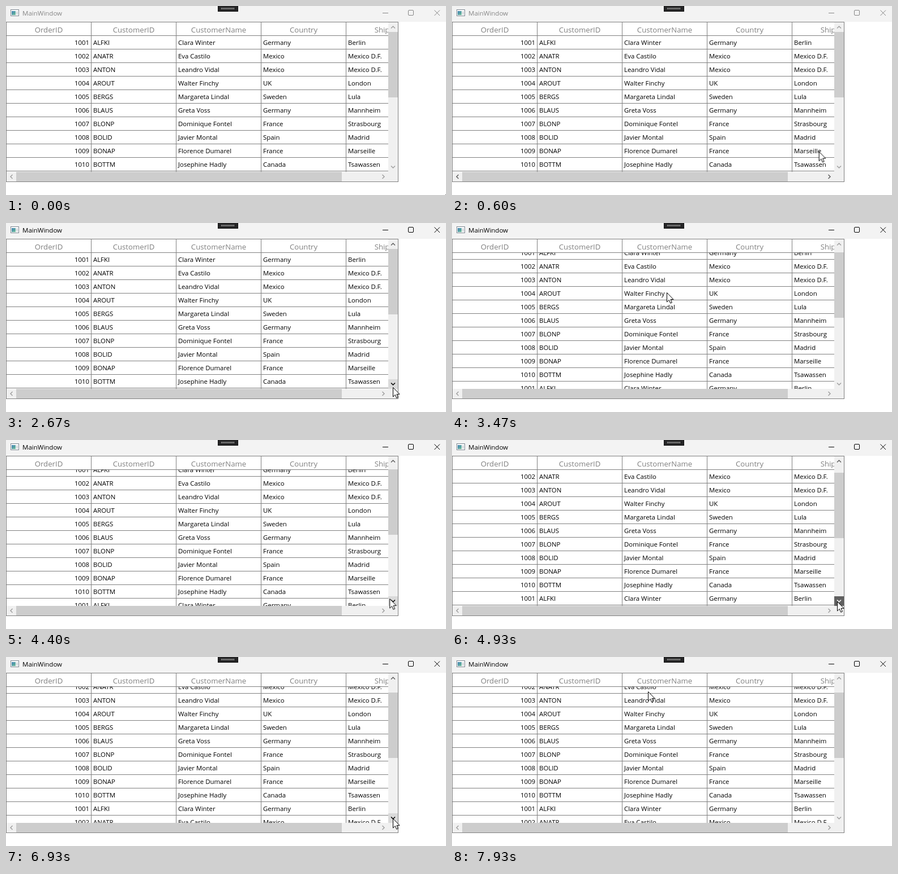
Animation of 777x335 px, one loop 8 s. Source, as an HTML page:

```html
<!DOCTYPE html>
<html lang="en">
<head>
<meta charset="utf-8">
<title>MainWindow</title>
<style>
  html, body { margin: 0; width: 100%; height: 100%; overflow: hidden; background: #fff; }
  body { position: relative; font: 11.4px "Open Sans", "Noto Sans", sans-serif; color: #000; cursor: default; }
  div, svg { position: absolute; box-sizing: border-box; }
  svg { fill: none; overflow: visible; }

  /* one 120-step clock shared by every part */
  .anim { animation: 8s step-end -4ms infinite; }

  #bar { left: 0; top: 0; width: 777px; height: 28px; background: #f3f3f3; animation-name: activate; }
  #bar span { position: absolute; left: 29px; top: 0; font-size: 11.5px; line-height: 26px; }
  #bar svg { left: 0; top: 0; }
  #tool { left: 374px; top: 0; width: 36px; height: 10px; background: #252526; border: 1px solid #111; border-top: 0; }
  #tool div { left: 5px; top: 3px; width: 24px; height: 3px;
    background: repeating-linear-gradient(90deg, #aaa 0 1px, transparent 1px 2px); }

  #grid { left: 0; top: 28px; width: 693px; height: 284px; border: 1px solid #808080; background: #fff; overflow: hidden; }
  #head { left: 0; top: 0; width: 674px; height: 24px; overflow: hidden; }
  #view { left: 0; top: 24px; width: 674px; height: 241px; overflow: hidden; }
  #rows { left: 0; top: 0; width: 750px; animation-name: scroll; }
  .line { width: 750px; height: 24px; }
  .cell { top: 0; width: 150px; height: 24px; padding: 0 3px; line-height: 23px; white-space: nowrap;
    border: solid #808080; border-width: 0 1px 1px 0; }
  .cell:first-child { text-align: right; }
  #head .cell { padding-top: 3px; line-height: 20px; font-size: 13.2px; text-align: center; color: #808080; }

  #vbar { left: 674px; top: 0; width: 17px; height: 282px; background: #f0f0f0; }
  #hbar { left: 0; top: 265px; width: 674px; height: 17px; background: #f0f0f0; }
  .thumb { background: #cdcdcd; }
  #vthumb { left: 0; top: 17px; width: 17px; height: 116px; animation-name: thumb; }
  #hthumb { left: 17px; top: 0; width: 575px; height: 17px; }
  .btn { width: 17px; height: 17px; color: #a0a0a0; }
  .btn svg { left: 0; top: 0; stroke: currentColor; stroke-width: 1.5; }
  #up { left: 0; top: 0; animation-name: up; }
  #down { left: 0; top: 248px; animation-name: down; }
  #down svg { transform: rotate(180deg); }
  #left { left: 0; top: 0; animation-name: side; }
  #left svg { transform: rotate(-90deg); }
  #right { left: 657px; top: 0; animation-name: side; }
  #right svg { transform: rotate(90deg); }
  #mouse { left: 0; top: 0; animation-name: mouse; }

  @keyframes activate {
    0% { color: #868686; }
    33.333%, 100% { color: #000; }
  }
  @keyframes scroll {
    0% { transform: none; }
    34.167% { transform: translateY(-12px); }
    60.833% { transform: translateY(-24px); }
    85%, 100% { transform: translateY(-36px); }
  }
  @keyframes thumb {
    0% { transform: none; background: #cdcdcd; }
    19.167% { background: #a6a6a6; }
    20.833% { background: #cdcdcd; }
    34.167% { transform: translateY(6px); }
    60.833% { transform: translateY(12px); }
    85%, 100% { transform: translateY(17px); background: #cdcdcd; }
  }
  @keyframes up {
    0%, 24.167%, 39.167%, 65.833%, 87.5%, 100% { color: #a0a0a0; background: #f0f0f0; }
    13.333%, 19.167%, 27.5%, 51.667%, 80.833% { color: #606060; background: #f0f0f0; }
    15% { color: #000; background: #dadada; }
  }
  @keyframes down {
    0%, 24.167%, 39.167%, 65.833%, 87.5%, 100% { color: #a0a0a0; background: #f0f0f0; }
    13.333%, 51.667% { color: #606060; background: #f0f0f0; }
    23.333%, 27.5%, 35%, 52.5%, 62.5%, 80.833%, 86.667% { color: #000; background: #dadada; }
    34.167%, 60.833%, 85% { color: #fff; background: #606060; }
  }
  @keyframes side {
    0%, 9.167%, 27.5%, 100% { color: #a0a0a0; }
    6.667%, 25% { color: #606060; }
  }
  @keyframes mouse {
    0% { transform: translate(776px, 334px); }
    3.333% { transform: translate(723px, 334px); }
    4.167% { transform: translate(700px, 345px); }
    6.667% { transform: translate(655px, 291px); animation-timing-function: steps(3); }
    9.167% { transform: translate(633px, 191px); }
    10% { transform: translate(633px, 191px); animation-timing-function: steps(6); }
    15% { transform: translate(678px, 48px); animation-timing-function: steps(2); }
    16.667% { transform: translate(680px, 36px); }
    17.5% { transform: translate(680px, 36px); animation-timing-function: steps(7); }
    23.333% { transform: translate(677px, 265px); animation-timing-function: steps(2); }
    25% { transform: translate(662px, 302px); animation-timing-function: steps(2); }
    26.667% { transform: translate(668px, 313px); animation-timing-function: steps(2); }
    28.333% { transform: translate(683px, 291px); }
    37.5% { transform: translate(683px, 291px); animation-timing-function: steps(7); }
    43.333% { transform: translate(379px, 123px); }
    45% { transform: translate(379px, 123px); animation-timing-function: steps(4); }
    48.333% { transform: translate(591px, 245px); animation-timing-function: steps(4); }
    51.667% { transform: translate(675px, 278px); animation-timing-function: steps(9); }
    59.167% { transform: translate(680px, 285px); }
    60.833% { transform: translate(680px, 286px); }
    65% { transform: translate(680px, 286px); animation-timing-function: steps(6); }
    70% { transform: translate(400px, 120px); animation-timing-function: steps(2); }
    71.667% { transform: translate(282px, 62px); animation-timing-function: steps(6); }
    76.667% { transform: translate(639px, 283px); animation-timing-function: steps(3); }
    79.167% { transform: translate(670px, 286px); }
    80% { transform: translate(670px, 286px); animation-timing-function: steps(3); }
    82.5% { transform: translate(683px, 286px); }
    86.667% { transform: translate(683px, 286px); animation-timing-function: steps(10); }
    95% { transform: translate(322px, 61px); animation-timing-function: steps(5); }
    99.167%, 100% { transform: translate(346px, 61px); }
  }
</style>
</head>
<body>
<div id="bar" class="anim">
  <svg width="777" height="28" stroke="currentColor">
    <defs><linearGradient id="pane" x2="1" y2="1">
      <stop stop-color="#3f7fb5"/><stop offset="1" stop-color="#6fbf95"/>
    </linearGradient></defs>
    <rect x="8.5" y="6.5" width="14" height="11" fill="#fff" stroke="#7d8791"/>
    <rect x="10" y="9" width="7" height="7" fill="url(#pane)" stroke="none"/>
    <path d="M18 10.5h3M18 12.5h3M18 14.5h3" stroke="#b5bcc3"/>
    <path d="M665 12.5h10"/>
    <rect x="710.5" y="7.5" width="9" height="9" rx="1.5"/>
    <path d="M756.5 7.5l9.5 9.5m0-9.5l-9.5 9.5"/>
  </svg>
  <span>MainWindow</span>
</div>
<div id="tool"><div></div></div>

<div id="grid">
  <div id="head"></div>
  <div id="view"><div id="rows" class="anim"></div></div>
  <div id="vbar">
    <div id="vthumb" class="thumb anim"></div>
    <div id="up" class="btn anim"></div>
    <div id="down" class="btn anim"></div>
  </div>
  <div id="hbar">
    <div id="hthumb" class="thumb"></div>
    <div id="left" class="btn anim"></div>
    <div id="right" class="btn anim"></div>
  </div>
</div>

<svg id="mouse" class="anim" width="13" height="21">
  <path d="M.5.5V17l3.8-3.6 2.4 5.8 2.7-1.1-2.4-5.7h5z" fill="#fff" stroke="#000"/>
</svg>

<script>
  const heads = ["OrderID", "CustomerID", "CustomerName", "Country", "ShipCity"];
  const orders = [
    ["ALFKI", "Clara Winter", "Germany", "Berlin"],
    ["ANATR", "Eva Castilo", "Mexico", "Mexico D.F."],
    ["ANTON", "Leandro Vidal", "Mexico", "Mexico D.F."],
    ["AROUT", "Walter Finchy", "UK", "London"],
    ["BERGS", "Margareta Lindal", "Sweden", "Lula"],
    ["BLAUS", "Greta Voss", "Germany", "Mannheim"],
    ["BLONP", "Dominique Fontel", "France", "Strasbourg"],
    ["BOLID", "Javier Montal", "Spain", "Madrid"],
    ["BONAP", "Florence Dumarel", "France", "Marseille"],
    ["BOTTM", "Josephine Hadly", "Canada", "Tsawassen"]
  ];

  const line = (cells, y) => `<div class="line" style="top:${y}px">` +
    cells.map((c, i) => `<div class="cell" style="left:${i * 150}px">${c}</div>`).join("") + "</div>";

  document.getElementById("head").innerHTML = line(heads, 0);
  document.getElementById("rows").innerHTML = Array.from({ length: 13 }, (_, i) => {
    const n = i % orders.length;
    return line([1001 + n, ...orders[n]], i * 24);
  }).join("");

  for (const b of document.querySelectorAll(".btn"))
    b.innerHTML = '<svg width="17" height="17"><path d="M5 10.5l3.5-3.5 3.5 3.5"/></svg>';
</script>
</body>
</html>
```
